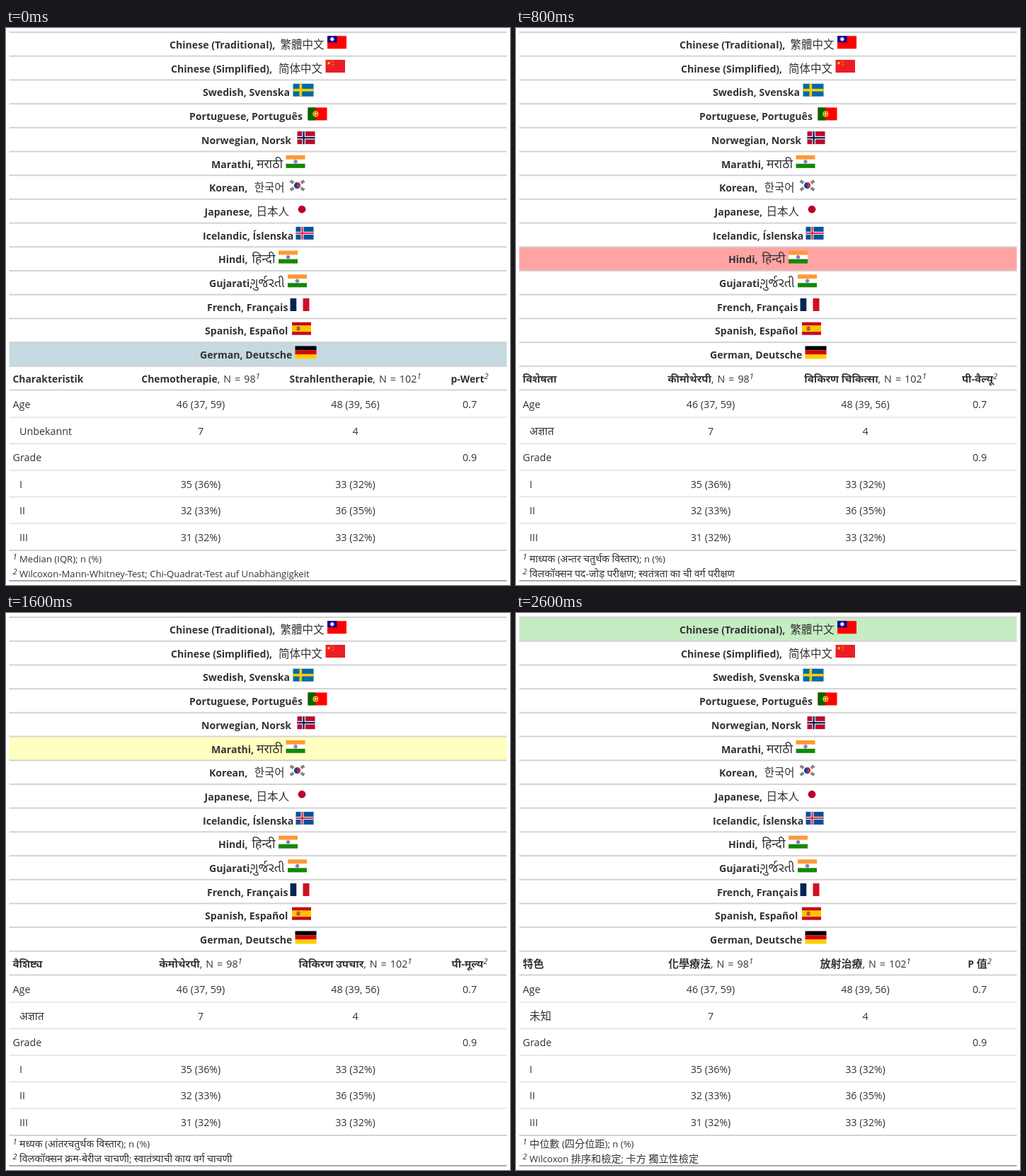
An HTML page for the animation above (2.8 s loop, 712x787 px).

```html
<!DOCTYPE html>
<html lang="en">
<head>
<meta charset="utf-8">
<title>Table translations</title>
<style>
html, body { margin: 0; width: 100%; height: 100%; overflow: hidden; background: #fff; }
svg { display: block; }
text { font: 14.3px "Open Sans", "Noto Sans", "Noto Sans Devanagari", "Noto Sans Gujarati", "Noto Sans CJK JP", sans-serif; fill: #333; white-space: pre; }
text:lang(zh-TW) { font-family: "Open Sans", "Noto Sans CJK TC", sans-serif; }
text:lang(zh-CN) { font-family: "Open Sans", "Noto Sans CJK SC", sans-serif; }
text:lang(ko) { font-family: "Open Sans", "Noto Sans CJK KR", sans-serif; }
text.name { font-size: 14.1px; font-weight: 700; }
text.native { font-size: 15.5px; }
text.medium { font-weight: 500; }
text.indic { font-size: 17.6px; }
text.note { font-size: 13.13px; }
.b { font-size: 13.9px; font-weight: 700; }
.n { word-spacing: 1.3px; }
.s { font-size: 11px; font-style: italic; }
.wide { font-size: 1.08em; }
.mid { text-anchor: middle; }
.end { text-anchor: end; }
</style>
</head>
<body>
<svg width="712" height="787" viewBox="0 0 712 787">
  <g id="marks"></g>
  <g id="base"></g>
  <g id="words"></g>
</svg>
<script>
const STEP = 200, PITCH = 33.7, TOP = 6;

const rect = (x, y, w, h, fill) => `<rect x="${x}" y="${y}" width="${w}" height="${h}" fill="${fill}"/>`;
const band = (y, h, fill) => rect(4.5, y, 703, h, fill);
const disc = (x, y, r, fill, extra = '') => `<circle cx="${x}" cy="${y}" r="${r}" fill="${fill}" ${extra}/>`;
const wide = s => s.replace(/[\u0900-\u0aff\u1100-\u11ff\u3040-\uffff]+/g, m => `<tspan class="wide">${m}</tspan>`);
const text = (x, y, s, cls = '', lang = 'en') => `<text x="${x}" y="${y}" class="${cls}" lang="${lang}">${s}</text>`;
const bold = s => `<tspan class="b">${wide(s)}</tspan>`;
const sup = n => `<tspan class="s" dy="-4.5">${n}</tspan>`;

// Flags, all 18 px high
const cross = (w, x, y, t, c) => rect(x, 0, t, 18, c) + rect(0, y, w, t, c);
const rows = (w, ...cs) => cs.map((c, i) => rect(0, i * 6, w, 6.05, c)).join('');
const star = (x, y, r) => {
  const pts = Array.from({ length: 10 }, (_, i) => {
    const a = i * Math.PI / 5, k = i % 2 ? r * 0.4 : r;
    return `${(x + k * Math.sin(a)).toFixed(2)},${(y - k * Math.cos(a)).toFixed(2)}`;
  });
  return `<polygon points="${pts.join(' ')}" fill="#ffde00"/>`;
};
const trigram = (x, y, a) => `<g transform="translate(${x} ${y}) rotate(${a})">` +
  [-1.8, 0, 1.8].map(d => rect(d - 0.5, -2.1, 1, 4.2, '#222')).join('') + '</g>';

const flags = {
  taiwan: rect(0, 0, 27, 18, '#fe0000') + rect(0, 0, 13.5, 9, '#000095') +
    disc(6.75, 4.5, 2.2, '#fff') + disc(6.75, 4.5, 2.8, 'none', 'stroke="#fff" stroke-width="1" stroke-dasharray=".8 .66"'),
  china: rect(0, 0, 27.5, 18, '#ee1c25') + star(4.6, 4.6, 2.9) +
    star(9.2, 1.9, 1) + star(11, 3.7, 1) + star(11, 6.4, 1) + star(9.2, 8.2, 1),
  sweden: rect(0, 0, 29, 18, '#006aa7') + cross(29, 9, 7.2, 3.6, '#fecc00'),
  portugal: rect(0, 0, 27, 18, '#f00') + rect(0, 0, 10.8, 18, '#060') + disc(10.8, 9, 4, '#ffe000') +
    disc(10.8, 9, 2.9, '#d8a000') + rect(8.8, 6.6, 4, 4.6, '#e02020') + rect(9.6, 7.3, 2.4, 3, '#fff'),
  norway: rect(0, 0, 25, 18, '#ba0c2f') + cross(25, 6.8, 6.7, 4.6, '#fff') + cross(25, 7.95, 7.85, 2.3, '#00205b'),
  india: rows(27, '#ff9933', '#fff', '#138808') +
    disc(13.5, 9, 2.2, '#fff', 'stroke="#000088" stroke-width=".6"') +
    disc(13.5, 9, 1.2, 'none', 'stroke="#000088" stroke-width="1.2" stroke-dasharray=".3 .6"') + disc(13.5, 9, .6, '#000088'),
  korea: rect(0, 0, 27, 18, '#fff') + '<g transform="translate(13.5 9) rotate(33.7)">' + disc(0, 0, 4.6, '#0047a0') +
    '<path d="M-4.6 0A4.6 4.6 0 0 1 4.6 0A2.3 2.3 0 0 1 0 0A2.3 2.3 0 0 0 -4.6 0" fill="#cd2e3a"/></g>' +
    trigram(6, 4, 33.7) + trigram(21, 4, -33.7) + trigram(6, 14, -33.7) + trigram(21, 14, 33.7),
  japan: rect(0, 0, 27, 18, '#fff') + disc(13.5, 9, 5.4, '#bc002d'),
  iceland: rect(0, 0, 25, 18, '#02529c') + cross(25, 7, 7, 4, '#fff') + cross(25, 8, 8, 2, '#dc1e35'),
  france: rect(0, 0, 9, 18, '#002654') + rect(9, 0, 9, 18, '#fff') + rect(18, 0, 9, 18, '#ce1126'),
  spain: rect(0, 0, 27, 18, '#c60b1e') + rect(0, 4.5, 27, 9, '#ffc400') + rect(6, 6.6, 1, 5, '#b09070') +
    rect(11, 6.6, 1, 5, '#b09070') + rect(7.4, 7, 3.2, 4.6, '#ad1519') + rect(7.6, 5.6, 2.8, 1.2, '#c8502a') + disc(9, 9.2, .8, '#e0b0a0'),
  germany: rows(30, '#000', '#d00', '#ffce00')
};

// English name, x, native name, its class, flag, flag x, language code
const langs = [
  ['Chinese (Traditional),', 231, '繁體中文', 'medium', 'taiwan', 454, 'zh-TW'],
  ['Chinese (Simplified),', 233, '简体中文', 'medium', 'china', 451.5, 'zh-CN'],
  ['Swedish, Svenska', 278, '', '', 'sweden', 405.5, 'sv'],
  ['Portuguese, Português', 259, '', '', 'portugal', 426.5, 'pt'],
  ['Norwegian, Norsk', 276, '', '', 'norway', 411.5, 'nb'],
  ['Marathi,', 290, 'मराठी', 'indic', 'india', 395.5, 'mr'],
  ['Korean,', 287, '한국어', '', 'korea', 398, 'ko'],
  ['Japanese,', 280.5, '日本人', 'medium', 'japan', 404.5, 'ja'],
  ['Icelandic, Íslenska', 278, '', '', 'iceland', 409.5, 'is'],
  ['Hindi,', 300, 'हिन्दी', 'indic', 'india', 385, 'hi'],
  ['Gujarati,', 287, 'ગુર્જરતી', 'indic', 'india', 398, 'gu'],
  ['French, Français', 284, '', '', 'france', 401.5, 'fr'],
  ['Spanish, Español', 281, '', '', 'spain', 404, 'es'],
  ['German, Deutsche', 274, '', '', 'germany', 408.5, 'de']
];

// Characteristic, two treatments, p-value, unknown, two notes
const words = {
  de: ['Charakteristik', 'Chemotherapie', 'Strahlentherapie', 'p-Wert', 'Unbekannt', 'Median (IQR); n (%)', 'Wilcoxon-Mann-Whitney-Test; Chi-Quadrat-Test auf Unabhängigkeit'],
  es: ['Característica', 'Quimioterapia', 'Radioterapia', 'p-valor', 'Desconocido', 'Mediana (RIC); n (%)', 'test de la suma de rangos de Wilcoxon; test chi-cuadrado de independencia'],
  fr: ['Caractéristique', 'Chimiothérapie', 'Radiothérapie', 'p-valeur', 'Manquant', 'Médiane (EI); n (%)', "test de Wilcoxon-Mann-Whitney; test du khi-deux d'indépendance"],
  gu: ['લાક્ષણિકતા', 'કીમોથેરાપી', 'રેડિયેશન થેરાપી', 'પી-મૂલ્ય', 'અજ્ઞાત', 'મધ્યસ્થ (આંતરચતુર્થક વિસ્તાર); n (%)', 'વિલ્કોક્સન ક્રમ-સરવાળા પરીક્ષણ; સ્વતંત્રતાનું કાઈ વર્ગ પરીક્ષણ'],
  hi: ['विशेषता', 'कीमोथेरपी', 'विकिरण चिकित्सा', 'पी-वैल्यू', 'अज्ञात', 'माध्यक (अन्तर चतुर्थक विस्तार); n (%)', 'विलकॉक्सन पद-जोड़ परीक्षण; स्वतंत्रता का ची वर्ग परीक्षण'],
  is: ['Breyta', 'Lyfjameðferð', 'Geislameðferð', 'p-gildi', 'Vantar', 'Miðgildi (fjórðungsbil); n (%)', 'Wilcoxon raðsummupróf; kí-kvaðrat próf'],
  ja: ['変数', '化学療法', '放射線治療', 'P値', '不明', '中央値 (四分位範囲); n (%)', 'Wilcoxonの順位和検定; カイ2乗検定'],
  ko: ['특성', '화학 요법', '방사선 요법', 'p-값', '알 수 없음', '중앙값 (사분위수 범위); n (%)', '윌콕슨 순위 합 검정; 카이제곱 독립성 검정'],
  mr: ['वैशिष्ट्य', 'केमोथेरपी', 'विकिरण उपचार', 'पी-मूल्य', 'अज्ञात', 'मध्यक (आंतरचतुर्थक विस्तार); n (%)', 'विलकॉक्सन क्रम-बेरीज चाचणी; स्वातंत्र्याची काय वर्ग चाचणी'],
  nb: ['Karakteristika', 'Kjemoterapi', 'Strålebehandling', 'p-verdi', 'Ukjent', 'Median (Interkvartilavstand); n (%)', 'Wilcoxon rangsumtest; Pearsons kjikvadrattest'],
  pt: ['Característica', 'Quimioterapia', 'Radioterapia', 'Valor p', 'Desconhecido', 'Mediana (AIQ); n (%)', 'Teste de soma de postos de Wilcoxon; Teste qui-quadrado de independência'],
  sv: ['Karakteristika', 'Kemoterapi', 'Strålterapi', 'p-värde', 'Okänd', 'Median (Kvartilavstånd); n (%)', 'Wilcoxon rangsumme test; chi-två test av oberoende'],
  'zh-CN': ['特征', '化疗', '放疗', 'P 值', '未知', '中位数 (四分位距); n (%)', 'Wilcoxon 秩和检验; 独立性卡方检验'],
  'zh-TW': ['特色', '化學療法', '放射治療', 'P 值', '未知', '中位數 (四分位距); n (%)', 'Wilcoxon 排序和檢定; 卡方 獨立性檢定']
};

const body = [
  ['Age', '46 (37, 59)', '48 (39, 56)', '0.7'],
  ['', '7', '4', ''],
  ['Grade', '', '', '0.9'],
  ['I', '35 (36%)', '33 (32%)', ''],
  ['II', '32 (33%)', '36 (35%)', ''],
  ['III', '31 (32%)', '33 (32%)', '']
];
const cols = [275, 493.5, 655];
const tints = ['#c6d9e1', '#c6ecc4', '#ffffbf', '#ffd190', '#ffa3a3', '#e2c1de'];

function drawBase() {
  let out = '';
  for (let i = 0; i < 16; i++) out += band(TOP + PITCH * i - 1, 2, '#d3d3d3');
  langs.forEach(([name, x, own, cls, flag, fx, lang], i) => {
    const y = 29 + PITCH * i;
    out += text(x, y, name, 'name');
    if (own) out += text(fx - 4.5, y, own, `native end ${cls}`, lang);
    out += `<g transform="translate(${fx} ${11.3 + PITCH * i})">${flags[flag]}</g>`;
  });
  body.forEach(([label, ...cells], i) => {
    const y = 537 + 37.5 * i;
    out += text(i === 0 || i === 2 ? 9.5 : 19, y, label);
    cells.forEach((s, k) => out += text(cols[k], y, s, 'mid'));
    if (i < 5) out += band(549.5 + 37.5 * i, 1, '#d3d3d3');
  });
  out += band(737, 2, '#d3d3d3') + band(780, 2, '#a8a8a8');
  out += text(9.5, 755, sup(1)) + text(9.5, 776, sup(2));
  document.getElementById('base').innerHTML = out;
}

function drawWords(lang) {
  const [head, chemo, radio, p, unknown, note1, note2] = words[lang];
  const arm = (s, n) => bold(s) + `<tspan class="n">, N = ${n}</tspan>` + sup(1);
  return text(9.5, 500.5, bold(head), '', lang) +
    text(cols[0], 500.5, arm(chemo, 98), 'mid', lang) +
    text(cols[1], 500.5, arm(radio, 102), 'mid', lang) +
    text(cols[2], 500.5, bold(p) + sup(2), 'mid', lang) +
    text(19, 574.5, wide(unknown), '', lang) +
    text(19, 755, wide(note1), 'note', lang) +
    text(19, 776, wide(note2), 'note', lang);
}

function addTurn(parent, markup, step) {
  const g = document.createElementNS('http://www.w3.org/2000/svg', 'g');
  g.innerHTML = markup;
  document.getElementById(parent).append(g);
  const n = langs.length, cut = 1 / n;
  g.animate([
    { opacity: 1, offset: 0 }, { opacity: 1, offset: cut },
    { opacity: 0, offset: cut }, { opacity: 0, offset: 1 }
  ], { duration: n * STEP, delay: (step - n) * STEP, iterations: Infinity });
}

drawBase();
langs.forEach((l, i) => {
  const step = langs.length - 1 - i;
  addTurn('marks', band(TOP + PITCH * i, PITCH, tints[step % tints.length]), step);
  addTurn('words', drawWords(l[6]), step);
});
</script>
</body>
</html>
```
